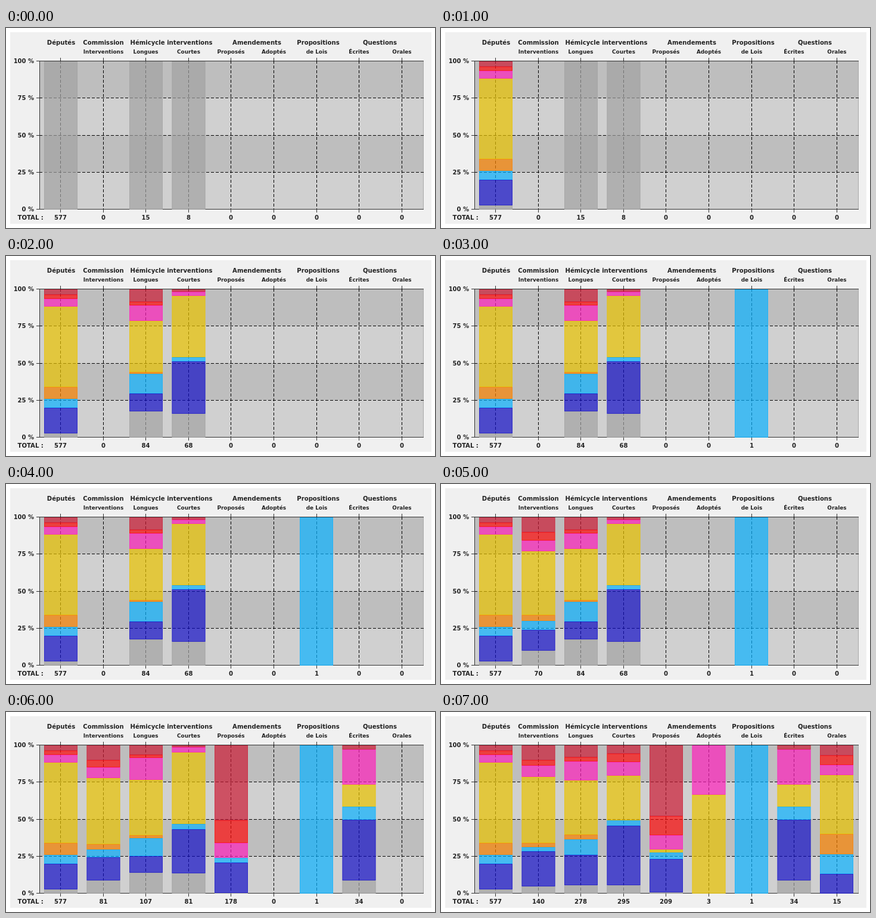
Write an HTML page with a canvas that moves like this. It is 720x336 px and loops after 8000 ms.

```html
<!DOCTYPE html>
<html lang="fr">
<head>
<meta charset="utf-8">
<style>
html, body { margin: 0; width: 100%; height: 100%; overflow: hidden; background: #fff; }
canvas { display: block; }
</style>
</head>
<body>
<canvas id="chart" width="720" height="336"></canvas>
<script>
const ctx = document.getElementById('chart').getContext('2d');
const TOP = 55, BOTTOM = 304, LEFT = 56, RIGHT = 701;
const HEIGHT = BOTTOM - TOP, COLUMNS = 9, PITCH = 71.55, BAR = 56;
const FONT = '"DejaVu Sans", Verdana, sans-serif';
const DASH = [5, 3];

// Groups in stacking order, from the top down.
const COLORS = {
  crimson: '204,28,54', red: '255,10,10', pink: '255,34,188', yellow: '234,196,0',
  orange: '251,131,0', sky: '12,178,255', blue: '20,17,200', grey: '163,163,163'
};

const titles = [['Députés', 92.5], ['Commission', 163.5], ['Hémicycle interventions', 277.5],
  ['Amendements', 421], ['Propositions', 524], ['Questions', 627.5]];
const subtitles = ['', 'Interventions', 'Longues', 'Courtes', 'Proposés', 'Adoptés',
  'de Lois', 'Écrites', 'Orales'];

const [DEPUTIES, COMMISSION, LONG, SHORT, PROPOSED, ADOPTED, LAWS, WRITTEN, ORAL] = subtitles.keys();

// Each second adds to the counts; shares and totals follow from the sums.
const additions = [
  { [DEPUTIES]: { grey: 577 }, [LONG]: { grey: 15 }, [SHORT]: { grey: 8 } },
  { [DEPUTIES]: { crimson: 21, red: 16, pink: 31, yellow: 311, orange: 47, sky: 34, blue: 101, grey: -561 } },
  {
    [LONG]: { crimson: 7, red: 2, pink: 9, yellow: 29, orange: 1, sky: 11, blue: 10 },
    [SHORT]: { crimson: 1, red: 0, pink: 2, yellow: 28, orange: 0, sky: 2, blue: 24, grey: 3 }
  },
  { [LAWS]: { sky: 1 } },
  {},
  { [COMMISSION]: { crimson: 7, red: 4, pink: 5, yellow: 30, orange: 3, sky: 4, blue: 10, grey: 7 } },
  {
    [COMMISSION]: { crimson: 1, pink: 1, yellow: 6, blue: 3 },
    [LONG]: { pink: 7, yellow: 11, orange: 1, sky: 2, blue: 2 },
    [SHORT]: { pink: 1, yellow: 11, sky: 1 },
    [PROPOSED]: { crimson: 90, red: 27, pink: 18, sky: 6, blue: 36, grey: 1 },
    [WRITTEN]: { crimson: 1, pink: 8, yellow: 5, sky: 3, blue: 14, grey: 3 }
  },
  {
    [COMMISSION]: { crimson: 6, red: 1, pink: 5, yellow: 26, orange: 1, blue: 20 },
    [LONG]: { crimson: 15, red: 6, pink: 20, yellow: 61, orange: 7, sky: 16, blue: 45, grey: 1 },
    [SHORT]: { crimson: 15, red: 17, pink: 25, yellow: 49, sky: 8, blue: 95, grey: 5 },
    [PROPOSED]: { crimson: 10, pink: 2, yellow: 4, sky: 3, blue: 11, grey: 1 },
    [ADOPTED]: { pink: 1, yellow: 2 },
    [ORAL]: { crimson: 1, red: 1, pink: 1, yellow: 6, orange: 2, sky: 2, blue: 2 }
  }
];

const lineX = i => Math.floor(91.75 + PITCH * i) + 0.5;
const rowY = i => Math.round(TOP + 0.1 + HEIGHT / 4 * i);

function countsAt(second) {
  const columns = Array.from({ length: COLUMNS }, () => ({}));
  for (const step of additions.slice(0, second + 1)) {
    for (const [i, added] of Object.entries(step)) {
      for (const [group, n] of Object.entries(added)) {
        columns[i][group] = (columns[i][group] || 0) + n;
      }
    }
  }
  return columns;
}

function text(str, x, y, size = 10.1, align = 'center') {
  ctx.font = `bold ${size}px ${FONT}`;
  ctx.textAlign = align;
  ctx.fillStyle = '#222';
  ctx.fillText(str, x, y);
}

function line(x1, y1, x2, y2, dash = [], color = dash.length ? '#000' : '#333') {
  ctx.setLineDash(dash);
  ctx.strokeStyle = color;
  ctx.beginPath();
  ctx.moveTo(x1, y1);
  ctx.lineTo(x2, y2);
  ctx.stroke();
}

function drawGrid() {
  ctx.fillStyle = '#fff';
  ctx.fillRect(0, 0, 720, 336);
  ctx.fillStyle = '#f0f0f0';
  ctx.fillRect(7, 7, 707, 322);
  for (let i = 0; i < 4; i++) {
    ctx.fillStyle = i % 2 ? '#d0d0d0' : '#bebebe';
    ctx.fillRect(LEFT, rowY(i), RIGHT - LEFT, rowY(i + 1) - rowY(i));
  }
  line(RIGHT - 0.5, TOP, RIGHT - 0.5, BOTTOM, [], '#a8a8a8');
  for (let i = 0; i <= 4; i++) {
    const y = rowY(i) + 0.5;
    line(LEFT - 5, y, LEFT + 5, y);
    line(LEFT, y, RIGHT, y, i % 4 ? DASH : []);
    text(100 - 25 * i + ' %', 47, rowY(i) + 4, 10, 'right');
  }
  line(LEFT + 0.5, TOP, LEFT + 0.5, BOTTOM + 1);
  for (let i = 0; i < COLUMNS; i++) {
    const x = lineX(i);
    line(x, TOP - 5, x, TOP + 5);
    line(x, TOP, x, BOTTOM, DASH);
    line(x, BOTTOM, x, BOTTOM + 6);
    text(subtitles[i], x, 43, 8.9);
  }
  titles.forEach(([str, x]) => text(str, x, 28));
  text('TOTAL :', 19.5, 322, 10.1, 'left');
}

function drawBar(counts, total, column) {
  const x = 64 + 71.5 * column;
  const edge = sum => TOP + 1 + Math.round(HEIGHT * sum / total);
  let sum = 0;
  ctx.setLineDash([]);
  for (const [group, rgb] of Object.entries(COLORS)) {
    if (!(group in counts)) continue;
    const y = edge(sum), h = edge(sum += counts[group]) - y;
    ctx.fillStyle = `rgba(${rgb},0.7)`;
    ctx.fillRect(x, y, BAR, h);
    // An empty group still shows its outline as a thin line.
    ctx.strokeStyle = `rgba(${rgb},0.55)`;
    ctx.strokeRect(x + 0.5, y + 0.5, BAR - 1, Math.max(h - 1, 0));
  }
}

function draw(second) {
  drawGrid();
  countsAt(second).forEach((counts, i) => {
    const total = Object.values(counts).reduce((a, b) => a + b, 0);
    if (total) drawBar(counts, total, i);
    text(total, lineX(i), 322);
  });
}

const start = performance.now();
function tick() {
  draw(Math.floor((performance.now() - start) / 1000) % additions.length);
  requestAnimationFrame(tick);
}
tick();
</script>
</body>
</html>
```
